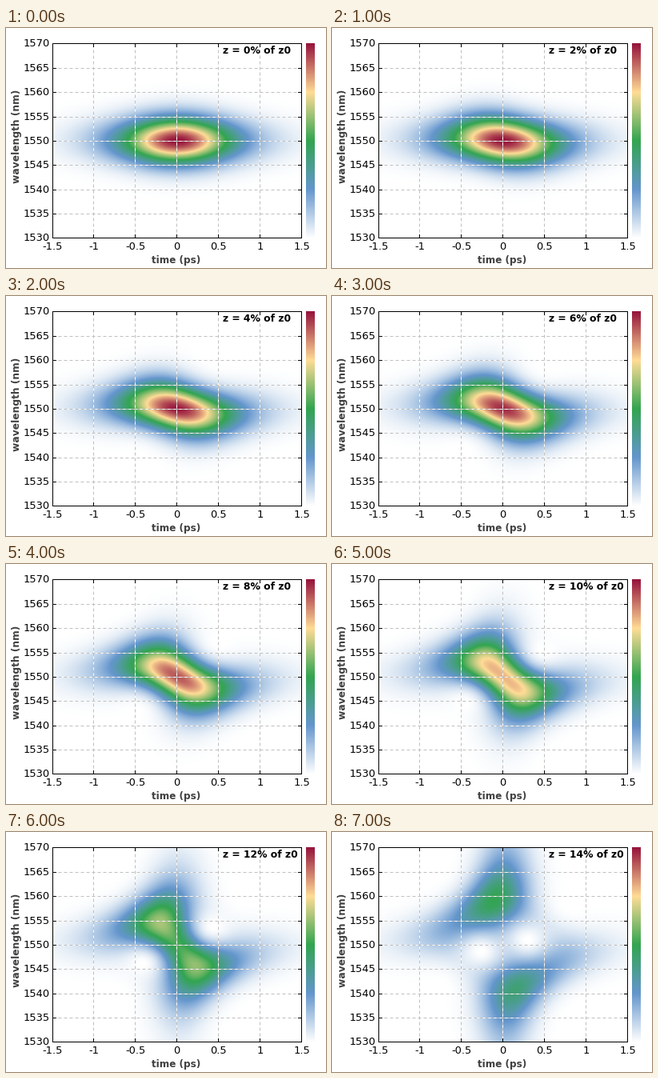
Write a matplotlib script that moves like this. It is 400 px wide and 300 px high and loops after 8 s.

```python
import numpy as np
import matplotlib.pyplot as plt
from matplotlib.animation import FuncAnimation
from matplotlib.colors import LinearSegmentedColormap

W, H, DPI = 400, 300, 100
PX = 72 / DPI                              # points per pixel
LEFT, RIGHT, TOP, BOTTOM = 58, 369, 19, 262
FRAMES, INTERVAL = 8, 1000

# Pulse: a fourth-order soliton, 1 ps long, seen through a 0.5 ps gate
ORDER = 4
T0 = 1 / 1.7627
GATE = 0.5
LIGHT, CENTER = 299792.458, 1550.0         # nm/ps, nm
STEEPEN = CENTER / (2 * np.pi * LIGHT * T0)
RAMAN = 0.003 / T0
STEP_PERCENT, SUBSTEPS = 2, 80

x = np.linspace(-12, 12, 1024, endpoint=False)
dx = x[1] - x[0]
k = 2 * np.pi * np.fft.fftfreq(x.size, dx)


def slope(f):
    return np.fft.ifft(1j * k * np.fft.fft(f))


def kerr(u):
    power = np.abs(u) ** 2
    return 1j * ORDER ** 2 * (power * u + 1j * STEEPEN * slope(power * u)
                              - RAMAN * u * slope(power).real)


def propagate(u, distance):
    h = distance / SUBSTEPS
    half = np.exp(-0.25j * k ** 2 * h)
    for _ in range(SUBSTEPS):
        u = np.fft.ifft(half * np.fft.fft(u))
        a = kerr(u)
        b = kerr(u + h / 2 * a)
        c = kerr(u + h / 2 * b)
        d = kerr(u + h * c)
        u = u + h / 6 * (a + 2 * b + 2 * c + d)
        u = np.fft.ifft(half * np.fft.fft(u))
    return u


delay = np.linspace(-1.5, 1.5, RIGHT - LEFT + 1)
wavelength = np.linspace(1570, 1530, BOTTOM - TOP + 1)
detune = 2 * np.pi * LIGHT * T0 * (1 / CENTER - 1 / wavelength)
window = np.exp(-2 * np.log(2) * ((x[None, :] * T0 - delay[:, None]) / GATE) ** 2)
kernel = np.exp(-1j * detune[:, None] * x[None, :])


def spectrogram(u):
    return np.abs(kernel @ (window * u).T) ** 2


maps = []
field = 1 / np.cosh(x) + 0j
for _ in range(FRAMES):
    maps.append(spectrogram(field))
    field = propagate(field, STEP_PERCENT / 100 * np.pi / 2)
peak = maps[0].max()
maps = [m / peak for m in maps]

cmap = LinearSegmentedColormap.from_list(
    "heat", ["#ffffff", "#6496cd", "#32a550", "#ffdc96", "#96143c"], N=512)

plt.rcParams["font.family"] = "DejaVu Sans"
fig = plt.figure(figsize=(W / DPI, H / DPI), dpi=DPI, facecolor="white")
ax = fig.add_axes([0, 0, 1, 1])
ax.set_axis_off()


def show(data, x0, x1):
    return ax.imshow(data, cmap=cmap, vmin=0, vmax=1, aspect="auto", zorder=1,
                     interpolation="nearest", extent=[x0, x1, BOTTOM + 1, TOP])


def line(xs, ys, color="black", z=3, **style):
    # pixel centres, left unsnapped so that each line fills one pixel row
    ax.plot(np.add(xs, 0.5), np.add(ys, 0.5), color=color, lw=PX, zorder=z,
            snap=False, solid_capstyle="projecting", dash_capstyle="butt", **style)


def grid_line(xs, ys):
    line(xs, ys, "white", 2)
    line(xs, ys, "#c0c0c0", 2.5, ls=(0, (4, 3)))


def label(px, py, text, size, ha="center", va="baseline", **style):
    return ax.text(px, py, text, fontsize=size * PX, ha=ha, va=va, zorder=4, **style)


heat = show(maps[0], LEFT, RIGHT + 1)
show(np.linspace(1, 0, BOTTOM - TOP + 1)[:, None], 375, 386)

TICK = 4

for i in range(7):
    gx = LEFT + int((RIGHT - LEFT) * i / 6)
    if 0 < i < 6:
        grid_line([gx, gx], [BOTTOM, TOP])
    line([gx, gx], [BOTTOM, BOTTOM - TICK])
    line([gx, gx], [TOP, TOP + TICK])
    label(gx + 0.5, 277, f"{-1.5 + 0.5 * i:g}", 13)

for i in range(9):
    gy = BOTTOM - int((BOTTOM - TOP) * i / 8)
    if 0 < i < 8:
        grid_line([LEFT, RIGHT], [gy, gy])
    line([LEFT, LEFT + TICK], [gy, gy])
    line([RIGHT, RIGHT - TICK], [gy, gy])
    label(54.5, gy + 4, str(1530 + 5 * i), 13, ha="right")

line([LEFT, RIGHT, RIGHT, LEFT, LEFT], [TOP, TOP, BOTTOM, BOTTOM, TOP])

label(212.5, 294, "time (ps)", 12, weight="bold", color="#404040")
label(14, 135.5, "wavelength (nm)", 12.3, va="center", rotation=90,
      weight="bold", color="#404040")
title = label(271, 32, "", 12.4, ha="left", weight="bold")

ax.set_xlim(0, W)
ax.set_ylim(H, 0)


def update(i):
    heat.set_data(maps[i])
    title.set_text(f"z = {STEP_PERCENT * i}% of z0")
    return heat, title


anim = FuncAnimation(fig, update, frames=FRAMES, interval=INTERVAL,
                     repeat=True, repeat_delay=0, blit=False)
plt.show()
```
